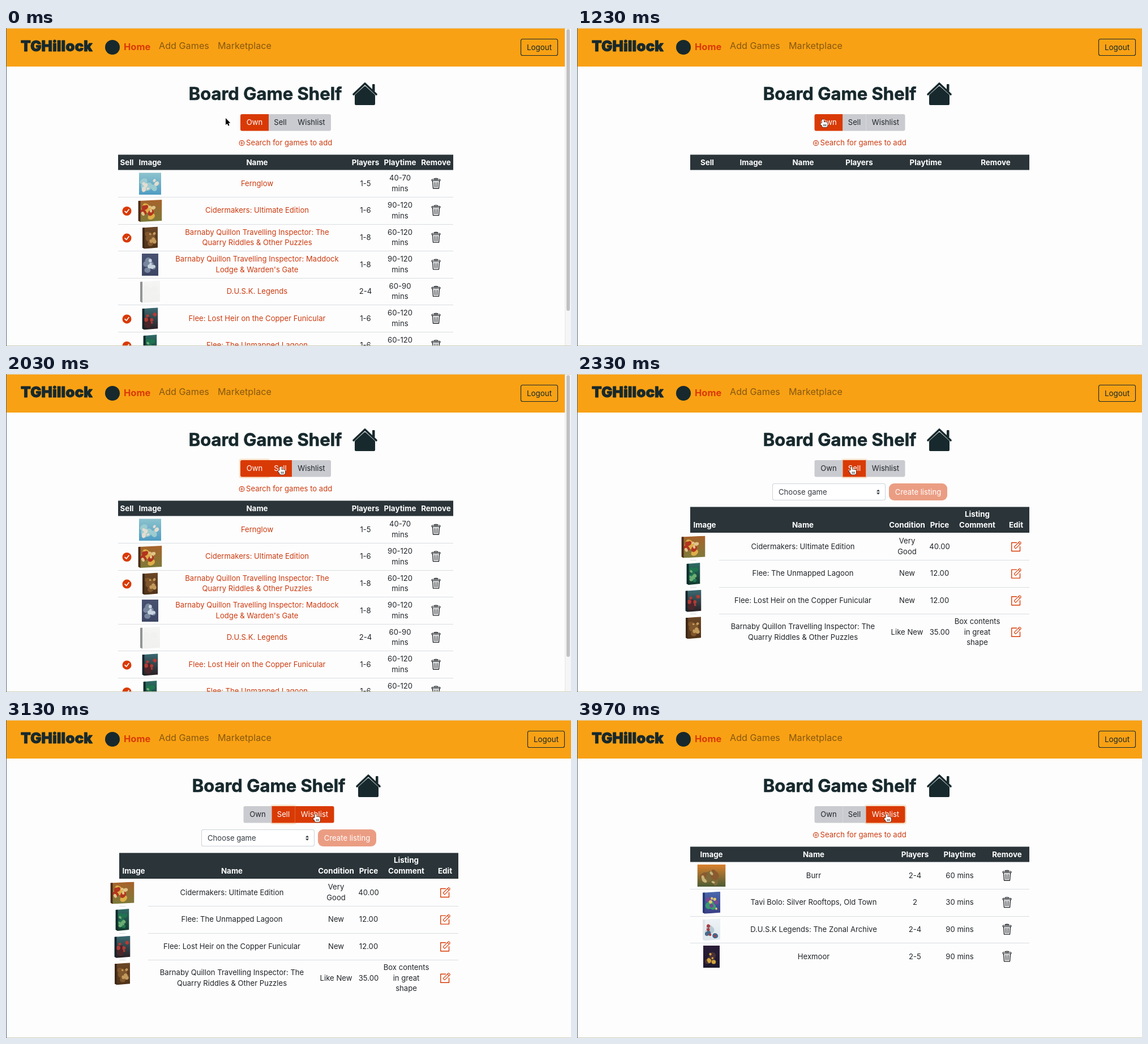
An HTML page with a canvas that plays this animation: 998x561 px, repeating every 4010 ms.

```html
<!DOCTYPE html>
<html lang="en">
<head>
<meta charset="utf-8">
<title>Board Game Shelf</title>
<style>
html, body { margin: 0; width: 100%; height: 100%; overflow: hidden; background: #fdfdfd; }
canvas { display: block; width: 998px; height: 561px; }
</style>
</head>
<body>
<canvas id="stage" width="998" height="561"></canvas>
<script>
const c = document.getElementById('stage').getContext('2d');
const W = 998, H = 561, LOOP = 4010;
const INK = '#212529', DARK = '#17292d', RED = '#d93a05', LINK = '#cc3b10',
      GREY = '#c9cbd0', HEAD = '#2a3439', LINE = '#d9dde0', PAPER = '#fdfdfd';
const ROW = 47.6, LEAD = 18.7;
const rowY = i => 274 + i * ROW;

// ---------- drawing helpers ----------
function box(x, y, w, h, fill, r = 0, stroke) {
  c.beginPath();
  c.roundRect(x, y, w, h, r);
  if (fill) { c.fillStyle = fill; c.fill(); }
  if (stroke) { c.strokeStyle = stroke; c.lineWidth = 1.1; c.stroke(); }
}

function trace(pts) {
  c.beginPath();
  for (let i = 0; i < pts.length; i += 2) c.lineTo(pts[i], pts[i + 1]);
}

function poly(fill, ...pts) {
  trace(pts);
  c.fillStyle = fill;
  c.fill();
}

function line(color, width, ...pts) {
  trace(pts);
  c.strokeStyle = color;
  c.lineWidth = width;
  c.stroke();
}

function blob(x, y, rx, ry, fill, turn = 0) {
  c.beginPath();
  c.ellipse(x, y, rx, ry, turn, 0, 7);
  c.fillStyle = fill;
  c.fill();
}

function at(x, y, draw) {
  c.save();
  c.lineCap = c.lineJoin = 'round';
  c.translate(x, y);
  draw();
  c.restore();
}

// y is the middle of the capital letters
function text(s, x, y, { color = INK, size = 13.1, weight = 400, align = 'center', bold = 0 } = {}) {
  c.font = `${weight} ${size}px Inter, "Open Sans", sans-serif`;
  c.textAlign = align;
  c.fillStyle = c.strokeStyle = color;
  c.fillText(s, x, y + size * 0.36);
  if (bold) {
    c.lineJoin = 'round';
    c.lineWidth = bold;
    c.strokeText(s, x, y + size * 0.36);
  }
}

function lines(s, x, y, opt) {
  const parts = s.split('|');
  parts.forEach((p, i) => text(p, x, y + (i - (parts.length - 1) / 2) * LEAD, opt));
}

function random(seed) {
  return () => (seed = seed * 16807 % 2147483647) / 2147483647;
}

// ---------- box covers: width, spine, top, bottom, accents ----------
const covers = {
  bird:   [39, '', '#8cc3cd', '#4f9cc4', '#9ccbd0', '#e4dcd0'],
  farm:   [42, '#4a2b1b', '#a8622a', '#7d7a3a', '#dfae48', '#b3341f', '#e0c48a'],
  sleuth: [27, '#3e2817', '#6b4726', '#4e3219', '#80562c', '#c39a5c'],
  manor:  [29, '', '#48516f', '#3c4664', '#78869f', '#c7d4df'],
  white:  [35, '#929494', '#f5f5f4', '#f0f0ef', '#f1f1f0'],
  train:  [28, '#12242b', '#3a6a72', '#2a1f23', '#4a262a', '#b33b35'],
  isle:   [24, '#0d2a29', '#2f6a66', '#123a2c', '#1f7350', '#6cae72'],
  forest: [50, '', '#db812d', '#4a5b35', '#7c6a38', '#8a5a30', '#c7b279'],
  town:   [31, '#283a77', '#4a68ac', '#3a3f86', '#3a9a72', '#764a91', '#d8c86e'],
  diver:  [31, '#dfe7eb', '#edf2f5', '#dde6ec', '#b8c9d2', '#45698b', '#a83e43'],
  castle: [29, '', '#2a1c38', '#1d192d', '#4a3038', '#d0a33a']
};

function cover(name, x, y) {
  const [w, spine, top, bottom, ...accents] = covers[name];
  const r = w / 2, h = 19.5, tilt = spine ? 2 : 0;
  const rnd = random(name.length * 7919 + w);
  at(x, y, () => {
    trace([-r, -h + tilt, r, -h, r, h - tilt, -r + 2 * tilt, h, -r, h - tilt]);
    c.clip();
    const g = c.createLinearGradient(0, -h, 0, h);
    g.addColorStop(0, top);
    g.addColorStop(1, bottom);
    box(-r, -h, w, 2 * h, g);
    for (let i = 0; i < 12; i++) {
      const k = accents[i * accents.length / 12 | 0], size = 1 - i / 16;
      blob((rnd() - 0.5) * w * 0.6, (rnd() - 0.4) * h, size * r * 0.4, size * 6, k, rnd() * 3);
    }
    if (spine) box(-r, -h, 4, 2 * h, spine);
  });
}

// ---------- icons ----------
function house(x) {
  at(x, 98, () => {
    box(13, 1, 4.5, 13, DARK, 1);
    line(DARK, 3.6, -20, 19, 0, 0, 20, 19);
    trace([-16, 21, 0, 6.5, 16, 21, 16, 36, -16, 36]);
    c.closePath();
    c.fillStyle = c.strokeStyle = DARK;
    c.lineWidth = 4;
    c.fill();
    c.stroke();
  });
}

function bin(x, y) {
  at(x, y, () => {
    box(-3, -8.8, 6, 2, null, 1, INK);
    box(-7.5, -7, 15, 2.4, null, 1, INK);
    line(INK, 1.3, -6.2, -4.4, -5, 9, 5, 9, 6.2, -4.4);
    for (const k of [-1, 0, 1]) line(INK, 1.1, k * 3, -2, k * 2.6, 6.5);
  });
}

function check(x, y) {
  at(x, y, () => {
    blob(0, 0, 8, 8, RED);
    line('#fff', 1.7, -3.4, 0.3, -0.8, 2.8, 3.5, -2.8);
  });
}

function pencil(x, y) {
  at(x, y, () => {
    line(RED, 1.4, 1, -7, -7.8, -7, -7.8, 8, 7, 8, 7, 0);
    c.rotate(-Math.PI / 4);
    box(-3, -2, 14, 4, PAPER, 1, RED);
    line(RED, 1.1, 8, -2, 8, 2);
  });
}

function arrow(x, y) {
  at(x, y, () => {
    const pts = [0, 0, 0, 12, 2.7, 9.6, 4.5, 13.6, 6.6, 12.7, 4.9, 8.8, 8.3, 8.6, 0, 0];
    line('#fff', 1.6, ...pts);
    poly('#000', ...pts);
  });
}

function hand(x, y) {
  at(x, y, () => {
    const parts = ([fill, stroke]) => {
      box(-1.5, 0, 3, 10, fill, 1.5, stroke);
      box(-2, 5, 10, 9, fill, 3, stroke);
      box(-4.2, 6.5, 4, 4, fill, 2, stroke);
    };
    [[null, '#111'], ['#fff']].forEach(parts);
    for (const k of [1.2, 3.2, 5.2]) line('#111', 0.8, k, 9, k, 12);
  });
}

// ---------- data ----------
const CIDER = 'Cidermakers: Ultimate Edition',
      QUARRY = 'Barnaby Quillon Travelling Inspector: The|Quarry Riddles & Other Puzzles',
      LODGE = "Barnaby Quillon Travelling Inspector: Maddock|Lodge & Warden's Gate",
      RAIL = 'Flee: Lost Heir on the Copper Funicular',
      LAGOON = 'Flee: The Unmapped Lagoon';

const owned = [
  ['bird', 'Fernglow', '1-5', '40-70|mins', false],
  ['farm', CIDER, '1-6', '90-120|mins', true],
  ['sleuth', QUARRY, '1-8', '60-120|mins', true],
  ['manor', LODGE, '1-8', '90-120|mins', false],
  ['white', 'D.U.S.K. Legends', '2-4', '60-90|mins', false],
  ['train', RAIL, '1-6', '60-120|mins', true],
  ['isle', LAGOON, '1-6', '60-120|mins', true]
];
const listed = [
  ['farm', CIDER, 'Very|Good', '40.00', ''],
  ['isle', LAGOON, 'New', '12.00', ''],
  ['train', RAIL, 'New', '12.00', ''],
  ['sleuth', QUARRY, 'Like New', '35.00', 'Box contents|in great|shape']
];
const wished = [
  ['forest', 'Burr', '2-4', '60 mins'],
  ['town', 'Tavi Bolo: Silver Rooftops, Old Town', '2', '30 mins'],
  ['diver', 'D.U.S.K Legends: The Zonal Archive', '2-4', '90 mins'],
  ['castle', 'Hexmoor', '2-5', '90 mins']
];

// ---------- page parts ----------
// cols maps each label to the middle of its column
function head(x, w, cols, y = 223.5, h = 27) {
  box(x, y, w, h, HEAD);
  for (const [label, mid] of Object.entries(cols)) {
    const extra = label.split('|').length - 1;
    lines(label, mid, y + h - 13.8 - extra * LEAD / 2, { color: '#fff', weight: 700, size: 13.4 });
  }
}

const rule = (x, y, w) => box(x, Math.round(y), w, 1, LINE);

function search(dx) {
  at(416.5 + dx, 203, () => {
    box(-4.4, -4.4, 8.8, 8.8, null, 4.4, LINK);
    line(LINK, 0.9, -2.5, 0, 2.5, 0);
    line(LINK, 0.9, 0, -2.5, 0, 2.5);
  });
  text('Search for games to add', 424 + dx, 202.3, { color: LINK, align: 'left' });
}

const views = {
  own() {
    search(0);
    const m = { Sell: 213.5, Image: 254.5, Name: 443.5, Players: 635, Playtime: 696, Remove: 759.5 };
    head(198, 592, m);
    owned.forEach(([pic, name, players, time, sale], i) => {
      const y = rowY(i);
      if (sale) check(m.Sell, y + 1.4);
      cover(pic, m.Image, y + 0.8);
      lines(name, m.Name, y, { color: LINK });
      text(players, m.Players, y);
      lines(time, m.Playtime, y);
      bin(m.Remove, y);
      rule(198, y + 24, 592);
    });
  },
  blank() {
    search(5.5);
    head(200, 599, { Sell: 230, Image: 307.5, Name: 399.5, Players: 498.5, Playtime: 616, Remove: 739.5 });
  },
  sell() {
    box(345.5, 193.5, 199, 29, '#fff', 3, '#ced4da');
    text('Choose game', 356, 208, { color: '#343a40', align: 'left' });
    for (const s of [-1, 1]) poly('#343a40', 529, 208.3 + s, 535, 208.3 + s, 532, 208.3 + s * 4.5);
    box(551, 193, 103, 30, '#eb9d83', 9);
    text('Create listing', 602.5, 208, { color: '#fff' });
    const m = { Image: 225.5, Name: 399, Condition: 583, Price: 640.5, 'Listing|Comment': 707, Edit: 775.5 };
    head(200, 599, m, 234.5, 45.5);
    listed.forEach(([pic, name, state, price, note], i) => {
      const top = 304 + i * ROW, y = note ? top + 8 : top;
      cover(pic, m.Image - 20, top + 1);
      lines(name, m.Name, y);
      lines(state, m.Condition, y);
      text(price, m.Price, y);
      lines(note, m['Listing|Comment'], y);
      pencil(m.Edit, y + 0.5);
      if (i < 3) {
        rule(200, top + 24, 11);
        rule(251, top + 24, 548);
      }
    });
  },
  wish() {
    search(5.5);
    const m = { Image: 237.5, Name: 418, Players: 597, Playtime: 676, Remove: 759.5 };
    head(200, 599, m);
    wished.forEach(([pic, name, players, time], i) => {
      const y = rowY(i);
      cover(pic, m.Image, y + 0.6);
      text(name, m.Name, y);
      text(players, m.Players, y);
      text(time, m.Playtime, y);
      bin(m.Remove, y);
      if (i < 3) rule(200, y + 24, 599);
    });
  }
};

const tabEdges = [414, 464, 505, 574];

function tabs(dx, active, hover, focus) {
  const tab = i => [tabEdges[i] + dx, tabEdges[i + 1] - tabEdges[i]];
  if (focus) {
    const [x, w] = tab(active);
    box(x - 2.5, 149.5, w + 5, 34.5, '#f7e3cb', 4);
  }
  ['Own', 'Sell', 'Wishlist'].forEach((s, i) => {
    const on = i === active || i === hover, [x, w] = tab(i);
    box(x, 152, w, 29.5, on ? RED : GREY, [[3, 0, 0, 3], 0, [0, 3, 3, 0]][i]);
    text(s, x + w / 2, 166.5, { color: on ? '#fff' : INK });
  });
}

function frame(wide) {
  box(0, 0, W, H, PAPER);
  box(1, 1, wide ? 997 : 986, 67, '#f9a114');
  text('TGHillock', 26, 32, { color: DARK, size: 26, weight: 900, align: 'left', bold: 0.8 });
  blob(188, 34, 13, 13, DARK);
  text('Home', 208, 33, { color: RED, size: 16.5, weight: 700, align: 'left' });
  const nav = { color: '#865811', size: 16.2, align: 'left' };
  text('Add Games', 270, 31, nav);
  text('Marketplace', 374, 31, nav);
  const x = wide ? 12 : 0;
  box(909.5 + x, 19.5, 65, 29, null, 3, DARK);
  text('Logout', 942 + x, 34, { color: DARK, size: 13.4 });
  text('Board Game Shelf', 458 + x / 2, 115.5, { color: DARK, size: 31, weight: 700, bold: 0.6 });
  house(634 + x / 2);
}

function edges(wide) {
  if (!wide) {
    box(987, 1, 11, 560, '#f5f5f5');
    box(987, 1, 1, 560, '#e6e6e6');
    box(990, 2, 6, 497, '#c1c1c1', 3);
  }
  box(0, 0, W, 1, '#dcd8c6');
  box(0, 560, W, 1, '#cfcdb9');
  box(0, 0, 1, H, '#5d696e');
}

// ---------- motion ----------
const stops = [[388, 159], [434.5, 161], [485, 163.5], [547, 166]];
const moves = [[250, 850], [1520, 1960], [2620, 3060]];
const ease = p => p * p * (3 - 2 * p);

function pointer(t) {
  let [x, y] = stops[0];
  moves.forEach(([a, b], i) => {
    const k = ease(Math.min(1, Math.max(0, (t - a) / (b - a))));
    x += (stops[i + 1][0] - stops[i][0]) * k;
    y += (stops[i + 1][1] - stops[i][1]) * k;
  });
  return [x, y];
}

function draw(t) {
  const view = t < 1130 ? 'own' : t < 1400 ? 'blank' : t < 2230 ? 'own' : t < 3400 ? 'sell' : 'wish';
  const wide = view !== 'own', dx = wide ? 5.5 : 0;
  const [x, y] = pointer(t);
  const hover = tabEdges.filter(e => x >= e + dx).length - 1;
  const active = { own: 0, blank: 0, sell: 1, wish: 2 }[view];
  frame(wide);
  tabs(dx, active, hover, t >= 1400);
  views[view]();
  edges(wide);
  (hover < 0 ? arrow : hand)(x, y);
}

const start = performance.now();
function run() {
  draw((performance.now() - start) % LOOP);
  requestAnimationFrame(run);
}
run();
</script>
</body>
</html>
```
